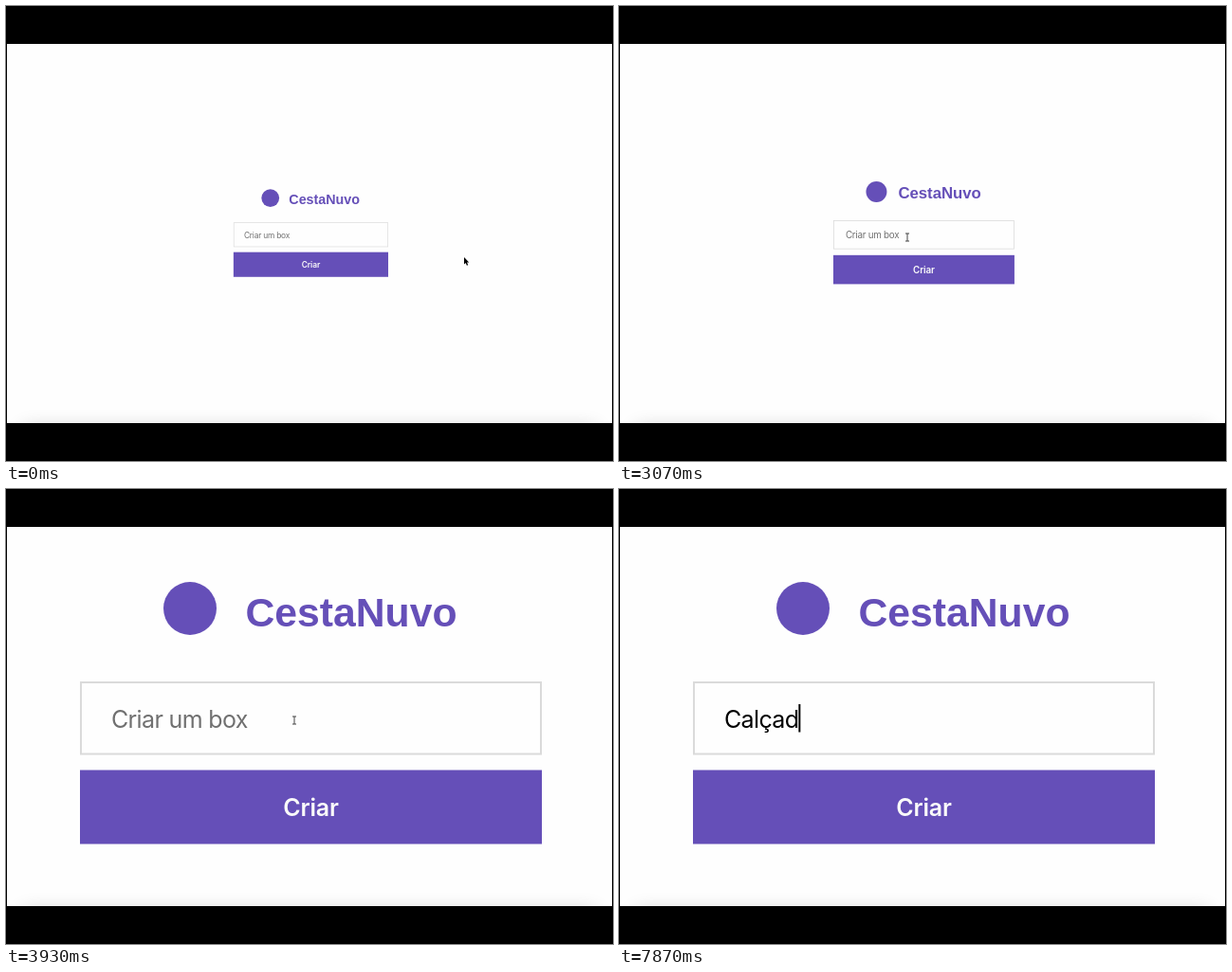
An HTML page with a canvas for the animation above (8000 ms loop, 640 by 480 pixels).

```html
<!DOCTYPE html>
<html lang="pt">
<head>
<meta charset="utf-8">
<title>Criar um box</title>
<style>
  html, body { margin: 0; width: 100%; height: 100%; overflow: hidden; background: #000; }
  canvas { display: block; width: 640px; height: 480px; }
</style>
</head>
<body>
<canvas id="stage" width="640" height="480"></canvas>
<script>
const ctx = document.getElementById('stage').getContext('2d');
const LOOP = 8000, TICK = 200 / 3;
const PURPLE = '#654fb8';
const CENTER = { x: 321.4, y: 241.1 };
const SMALL = 1 / 2.985;
const ZOOM = { start: 2976, end: 3268 };

// Field contents by time; null shows the placeholder.
const TYPED = [[0, null], [4330, 'C'], [5000, 'Ca'], [5200, 'Cal'], [6400, "Cal'"],
               [7130, 'Calç'], [7270, 'Calça'], [7870, 'Calçad']];
const CARET_ON = [[400, 930], [1470, 1930], [2470, 2930], [3470, 3930], [4330, 4870],
                  [5000, 5670], [6200, 6930], [7130, 7800], [7870, 8000]];

const clamp = v => Math.min(1, Math.max(0, v));
const progress = (t, a, b) => clamp((t - a) / (b - a));
const quartic = u => u < 0.5 ? 8 * u ** 4 : 1 - 8 * (1 - u) ** 4;
const glide = u => u < 0.5 ? 2 * u * u : 1 - 2 * (1 - u) ** 2;

function label(text, x, y, font, color, spacing = 0, align = 'left') {
  ctx.font = font;
  ctx.fillStyle = color;
  ctx.letterSpacing = spacing + 'px';
  ctx.textAlign = align;
  ctx.fillText(text, x, y);
  return ctx.measureText(text).width;
}

function drawPage() {
  ctx.fillStyle = '#000';
  ctx.fillRect(0, 0, 640, 480);
  ctx.save();
  ctx.beginPath();
  ctx.rect(1, 40, 638, 400);
  ctx.clip();
  ctx.fillStyle = '#fefefe';
  ctx.fillRect(0, 40, 640, 400);
  ctx.shadowColor = 'rgba(0,0,0,.2)';
  ctx.shadowBlur = 20;
  ctx.fillStyle = '#000';
  ctx.fillRect(18, 445, 604, 30);
  ctx.restore();
}

function drawField(t) {
  ctx.strokeStyle = '#dadada';
  ctx.lineWidth = 2;
  ctx.strokeRect(79, 204, 485, 75.5);
  const text = TYPED.filter(([at]) => t >= at).pop()[1];
  const x = 111, font = '25px Inter, "Liberation Sans", sans-serif';
  const width = label(text || 'Criar um box', x, 251.5, font, text ? '#000' : '#707070', -0.65);
  const end = x + (text ? width : 1);
  if (text && text.endsWith("'")) ctx.fillRect(end - 5, 254, 3.5, 1.5);
  if (CARET_ON.some(([a, b]) => t >= a && t < b)) {
    ctx.fillStyle = '#000';
    ctx.fillRect(end, 227, 2, 29.5);
  }
}

function drawForm(t) {
  const k = SMALL + (1 - SMALL) * quartic(progress(t, ZOOM.start, ZOOM.end));
  ctx.save();
  ctx.translate(CENTER.x, CENTER.y);
  ctx.scale(k, k);
  ctx.translate(-CENTER.x, -CENTER.y);

  ctx.fillStyle = PURPLE;
  ctx.beginPath();
  ctx.arc(194, 126, 28, 0, Math.PI * 2);
  ctx.fill();
  label('CestaNuvo', 252.5, 145, 'bold 42.7px "Liberation Sans", Arial, sans-serif', PURPLE);

  drawField(t);

  ctx.fillStyle = PURPLE;
  ctx.fillRect(78, 296.5, 487, 78);
  label('Criar', 321.5, 345, '600 25px Inter, "Liberation Sans", sans-serif', '#fafafa', -0.2, 'center');
  ctx.restore();
}

function drawArrow(x, y) {
  ctx.save();
  ctx.translate(x, y);
  ctx.beginPath();
  [[0, 0], [0, 7.6], [1.7, 6], [2.9, 8.8], [4.2, 8.2], [3, 5.5], [5.2, 5.4]]
    .forEach(([px, py]) => ctx.lineTo(px, py));
  ctx.closePath();
  ctx.strokeStyle = '#fff';
  ctx.lineWidth = 1;
  ctx.stroke();
  ctx.fillStyle = '#000';
  ctx.fill();
  ctx.restore();
}

function drawBeam(x, y) {
  ctx.fillStyle = '#444';
  ctx.fillRect(x - 0.5, y - 4, 1, 8);
  ctx.fillRect(x - 2, y - 4.5, 4, 1);
  ctx.fillRect(x - 2, y + 3.5, 4, 1);
}

function drawPointer(t) {
  if (t >= 4330) return;
  const u = glide(progress(t, 70, 730)), v = 1 - u;
  const x = 483 * v * v + 2 * 393 * u * v + 304 * u * u;
  const y = 265 * v * v + 2 * 250 * u * v + 244 * u * u;
  if (x < 403) drawBeam(x, y);
  else drawArrow(x, y);
}

function draw(now) {
  const tick = Math.floor((now % LOOP + 3.4) / TICK) % (LOOP / TICK);
  const t = Math.round(tick * TICK / 10) * 10;
  drawPage();
  drawForm(t);
  drawPointer(t < 130 ? 0 : t);
}

const begin = performance.now();
function loop() {
  draw(performance.now() - begin);
  requestAnimationFrame(loop);
}
loop();
</script>
</body>
</html>
```
